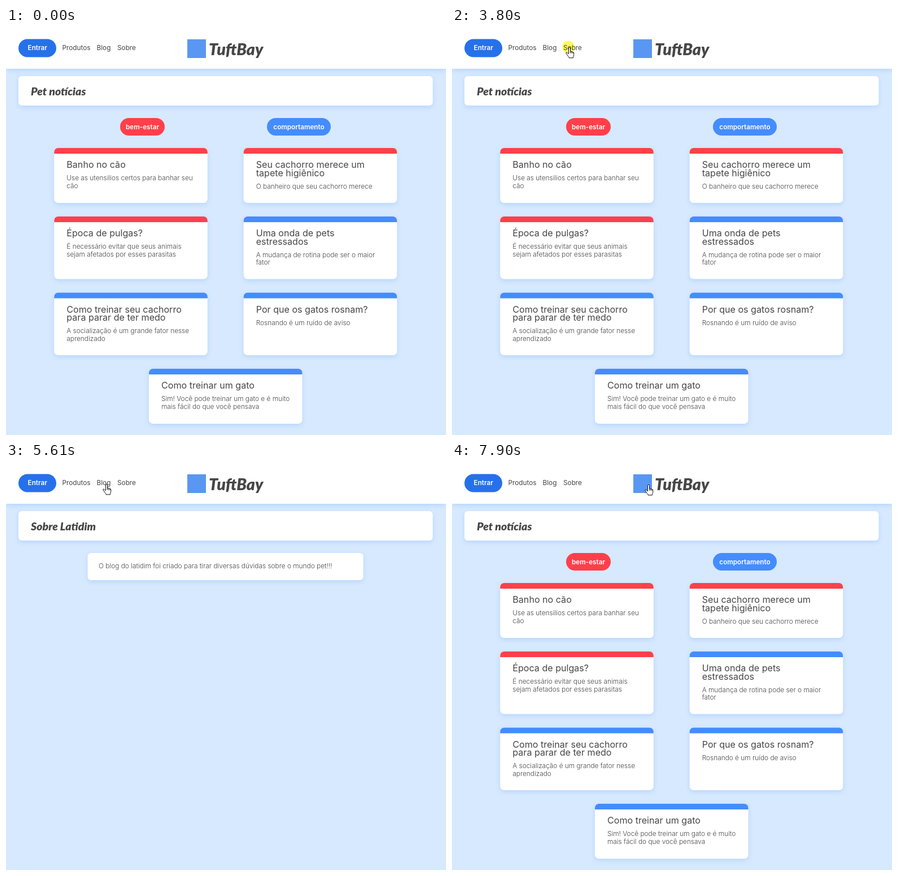
An HTML page for the animation above (8000 ms loop, 779x719 px).

```html
<!DOCTYPE html>
<html lang="pt-BR">
<head>
<meta charset="utf-8">
<title>Pet notícias</title>
<style>
html, body { margin: 0; width: 100%; height: 100%; overflow: hidden; background: #d7e9ff; }
svg { display: block; width: 779px; height: 719px; font-family: Inter, "Open Sans", sans-serif; }
text { fill: #464646; white-space: pre; }
.brand { font: italic 900 28.5px Lato, sans-serif; }
.title { font: italic 900 19.5px Lato, sans-serif; }
.nav { font-size: 11.8px; font-weight: 400; }
.pill { font-size: 11.7px; font-weight: 600; fill: #fff; text-anchor: middle; }
.head { font-size: 16.1px; font-weight: 400; }
.body { font-size: 11.85px; font-weight: 300; }
.tip { font: 10px "Open Sans", sans-serif; fill: #575757; }
.panel { fill: #fff; filter: drop-shadow(0 3px 4px rgba(70, 145, 255, .22)); }
#click { fill: #fdf966; mix-blend-mode: multiply; }
</style>
</head>
<body>
<svg viewBox="0 0 779 719">
  <rect width="779" height="719" fill="#d7e9ff"/>
  <rect class="panel" width="779" height="72"/>
  <rect x="22" y="19.5" width="67" height="32" rx="16" fill="#2671ea"/>
  <text class="pill" x="55.7" y="39">Entrar</text>
  <text class="nav" x="99.5" y="39">Produtos</text>
  <text class="nav" x="160.5" y="39">Blog</text>
  <text class="nav" x="197" y="39">Sobre</text>
  <rect x="321" y="20" width="33" height="33" fill="#5a97f2"/>
  <text class="brand" x="359" y="48">TuftBay</text>
  <rect class="panel" x="22" y="85" width="733.5" height="52" rx="6"/>
  <text class="title" id="title" x="44" y="119"></text>

  <g id="posts"></g>

  <g id="about">
    <rect class="panel" x="144.5" y="159" width="488" height="48" rx="6"/>
    <text class="body" x="164" y="186">O blog do latidim foi criado para tirar diversas dúvidas sobre o mundo pet!!!</text>
  </g>

  <g id="tip">
    <rect x="759.5" y="705.5" width="60" height="30" fill="#fff" stroke="#767676"/>
    <text class="tip" x="763.5" y="720">Parar</text>
  </g>

  <circle id="click" r="11"/>
  <g id="cursor" fill="#fff" stroke="#111" stroke-linejoin="round">
    <g id="hand">
      <path d="M-1.5 11.5V1.8a1.5 1.5 0 0 1 3 0V7q2-.8 2.2.8q2-.6 2.2.9q1.8-.3 1.8 1.3v3.5q0 1.5-1.2 3V18.8h-7.5v-1.5q-1.5-1-2.7-3.2l-2.2-3.3q-.6-2 1-1.8q1.2.3 2.6 2.5z"/>
      <path fill="none" d="M1.5 7v3.5M3.7 7.8v3M5.9 8.7v2.2"/>
    </g>
    <path id="arrow" d="M0 0V16l3.7-3.5 2.4 5.6 2.5-1.1-2.4-5.4h5z"/>
  </g>
</svg>
<script>
const LOOP = 8000, STEP = 70;
const RED = '#ff404a', BLUE = '#448dff';
const $ = id => document.getElementById(id);

const text = (cls, x, y, s) => `<text class="${cls}" x="${x}" y="${y}">${s}</text>`;

const tag = (x, w, color, s) =>
  `<rect x="${x}" y="159" width="${w}" height="31" rx="15.5" fill="${color}"/>` +
  text('pill', x + w / 2, 178.5, s);

const post = (color, head, body) => ({ color, heads: head.split('|'), bodies: body.split('|') });

const ROWS = [
  [post(RED, 'Banho no cão', 'Use as utensilios certos para banhar seu|cão'),
   post(RED, 'Seu cachorro merece um|tapete higiênico', 'O banheiro que seu cachorro merece')],
  [post(RED, 'Época de pulgas?', 'É necessário evitar que seus animais|sejam afetados por esses parasitas'),
   post(BLUE, 'Uma onda de pets|estressados', 'A mudança de rotina pode ser o maior|fator')],
  [post(BLUE, 'Como treinar seu cachorro|para parar de ter medo', 'A socialização é um grande fator nesse|aprendizado'),
   post(BLUE, 'Por que os gatos rosnam?', 'Rosnando é um ruído de aviso')],
  [post(BLUE, 'Como treinar um gato', 'Sim! Você pode treinar um gato e é muito|mais fácil do que você pensava')]
];

function card({ color, heads, bodies }, x, y, h) {
  const bodyY = 57 + (heads.length - 1) * 14.5;
  return `<g transform="translate(${x} ${y})">
    <rect class="panel" width="271.5" height="${h}" rx="7"/>
    <path fill="${color}" d="M0 10V7a7 7 0 0 1 7-7h257.5a7 7 0 0 1 7 7v3z"/>` +
    heads.map((s, i) => text('head', 22, 35 + i * 14.5, s)).join('') +
    bodies.map((s, i) => text('body', 22, bodyY + i * 13.6, s)).join('') + '</g>';
}

// Rows are centred; each is as tall as its longest card.
function layout() {
  let y = 212, out = '';
  for (const row of ROWS) {
    const lines = Math.max(...row.map(p => p.heads.length + p.bodies.length));
    const h = 56.5 + 13.5 * lines;
    const left = 253 - (row.length - 1) * 167.7;
    out += row.map((p, i) => card(p, left + i * 335.4, y, h)).join('');
    y += h + 24;
  }
  return out;
}

$('posts').innerHTML =
  tag(202, 79, RED, 'bem-estar') + tag(462, 113, BLUE, 'comportamento') + layout();

// Pointer moves; without a "from" a move continues where the last one ended.
const MOVES = [
  { start: 2190, end: 2460, from: [835, 195], to: [577, -20] },
  { start: 2790, end: 3060, from: [325, -12], to: [201, 36] },
  { start: 3460, end: 3530, to: [208, 34] },
  { start: 5140, end: 5610, to: [178, 37] },
  { start: 6470, end: 6960, to: [390, 38] },
  { start: 7030, end: 7170, to: [348, 38] }
];
MOVES.forEach((m, i) => m.from ??= MOVES[i - 1].to);

// The screen refreshes every STEP ms, so a move advances in small jumps.
function pointer(t) {
  const m = MOVES.findLast(m => m.start <= t);
  if (!m) return [-50, -50];
  const steps = Math.round((m.end - m.start) / STEP) + 1;
  const k = t >= m.end ? 1 : (Math.floor((t - m.start) / STEP) + 1) / steps;
  const e = Math.sin(k * Math.PI / 2);
  return m.from.map((a, i) => a + (m.to[i] - a) * e);
}

const within = (v, a, b) => v >= a && v < b;
const show = (id, on) => $(id).setAttribute('visibility', on ? 'visible' : 'hidden');
const place = (id, x, y) => $(id).setAttribute('transform', `translate(${x} ${y})`);

// A hand over the links and the brand, otherwise an arrow.
const overLink = (x, y) => within(y, 28, 60) &&
  (within(x, 160, 187) || within(x, 197, 230) || within(x, 320, 458));

function draw(t) {
  const about = within(t, 3870, 7580);
  const [x, y] = pointer(t);
  const hand = overLink(x, y);
  show('posts', !within(t, 3870, 7900));
  show('about', about);
  $('title').textContent = about ? 'Sobre Latidim' : 'Pet notícias';
  $('tip').setAttribute('opacity',
    within(t, 460, 1710) ? Math.min(1, (t - 390) / 210, (1710 - t) / 140) : 0);
  show('click', within(t, 3800, 3950) || within(t, 7500, 7580));
  show('hand', hand);
  show('arrow', !hand && y > -18);
  place('cursor', x, y);
  place('click', x - 2, y - .5);
}

const start = performance.now();
function tick(now) {
  draw(Math.max(0, now - start) % LOOP);
  requestAnimationFrame(tick);
}
draw(0);
requestAnimationFrame(tick);
</script>
</body>
</html>
```
